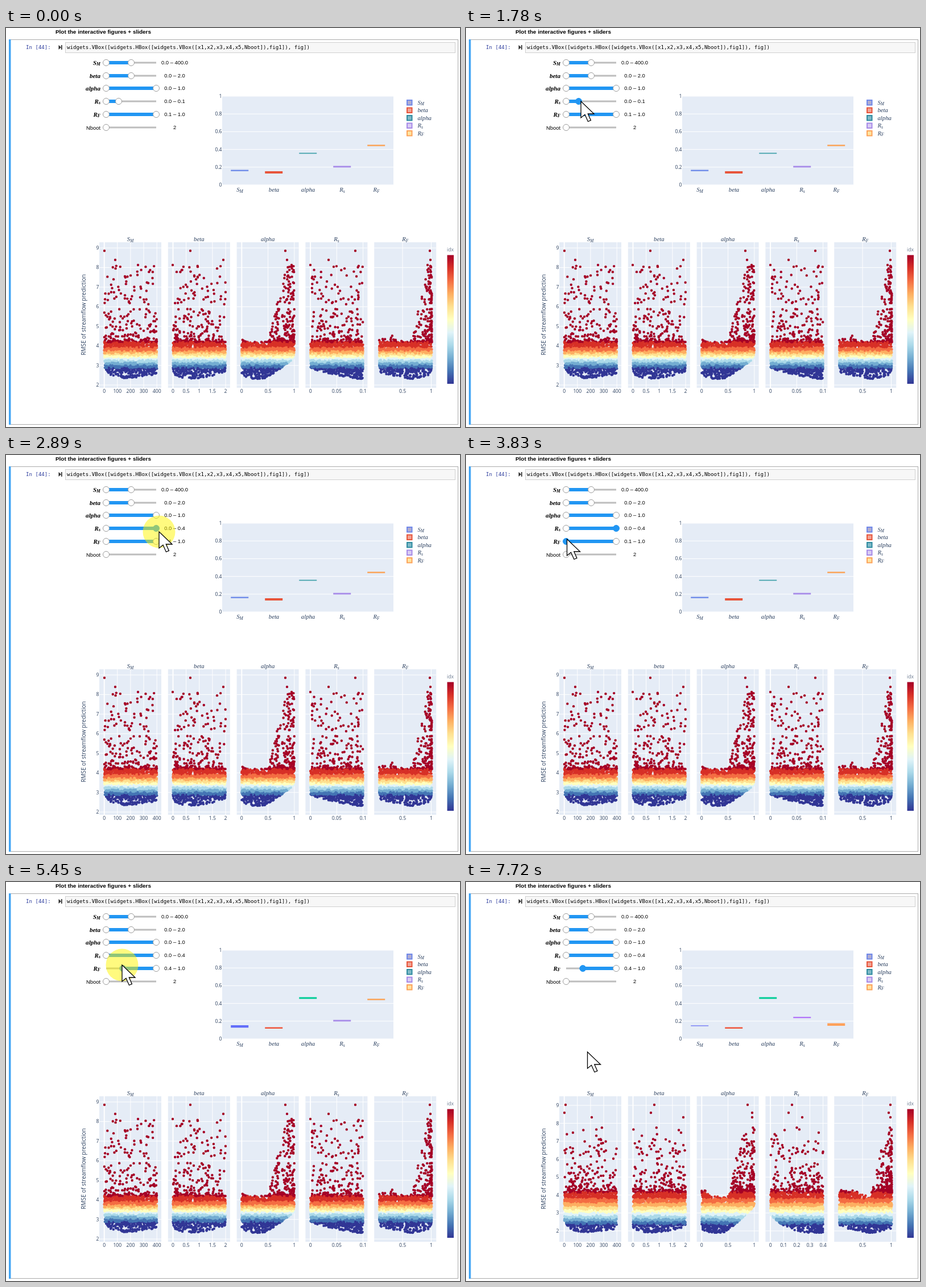
Animation of 798x702 px, one loop 8 s. Source, as an HTML page with a canvas:

```html
<!DOCTYPE html>
<html lang="en">
<head>
<meta charset="utf-8">
<title>Interactive figures</title>
<style>
  html, body { margin: 0; width: 100%; height: 100%; overflow: hidden; background: #fff; }
  svg, canvas { position: absolute; left: 0; top: 0; }
  text { white-space: pre; }
  .ui { font-family: "Liberation Sans", Arial, sans-serif; font-size: 9.4px; }
  .code { font-family: "DejaVu Sans Mono", monospace; font-size: 9.11px; }
  .math { font-family: "Liberation Serif", Times, serif; font-style: italic; font-size: 10.7px; fill: #2a3f5f; }
  .bold { font-weight: bold; font-size: 11.1px; fill: #000; }
  .tick { font-family: "Open Sans", sans-serif; font-size: 8.6px; fill: #2a3f5f; }
</style>
</head>
<body>
<svg id="page" width="798" height="702"></svg>
<canvas id="dots" width="798" height="702"></canvas>
<svg id="pointer" width="798" height="702"></svg>
<script>
const $ = id => document.getElementById(id);
const NAMES = ['S_M', 'beta', 'alpha', 'R_s', 'R_F'];
const SCALE = ['#a50026', '#d73027', '#f46d43', '#fdae61', '#fee090', '#ffffbf',
  '#e0f3f8', '#abd9e9', '#74add1', '#4575b4', '#313695'];
const BLUE = '#2196f3';

const rect = (x, y, w, h, fill, more = '') =>
  `<rect x="${x}" y="${y}" width="${w}" height="${h}" fill="${fill}" ${more}/>`;
const text = (x, y, s, cls, anchor = 'middle', more = '') =>
  `<text x="${x}" y="${y}" class="${cls}" text-anchor="${anchor}" ${more}>${s}</text>`;
const sub = s => s.replace(/_(.)/, '<tspan dy="1.6" font-size="0.7em">$1</tspan>');
const line = (x1, y1, x2, y2, width = 1) =>
  `<path d="M${x1} ${y1}L${x2} ${y2}" stroke="#fff" stroke-width="${width}"/>`;

// ---- notebook cell and bar chart frame
function notebook() {
  let s = text(87, 9.5, 'Plot the interactive figures + sliders', 'ui', 'start',
    'style="font-weight:bold;font-size:9.93px"');
  s += rect(5.5, 20.5, 789, 677, '#fff', 'stroke="#ababab"') + rect(5, 20, 3.5, 678, '#42a5f5');
  s += rect(104.5, 25.5, 685, 18, '#f7f7f7', 'stroke="#cfcfcf"');
  s += text(35, 37, 'In [44]:', 'code', 'start', 'fill="#303f9f"');
  s += '<path d="M92.5 30V38L97 34ZM97 30h1.7v8H97Z" fill="#333"/>';
  s += text(107, 37, 'widgets.VBox([widgets.HBox([widgets.VBox([x1,x2,x3,x4,x5,Nboot]),fig1]), fig])',
    'code', 'start');
  return s;
}

function barFrame() {
  const fills = ['#b1add0', '#f0a596', '#80bac8', '#d9cdf3', '#ffe4a0'];
  const edges = ['#6f88ea', '#e8553b', '#2f8ba0', '#a78be8', '#fda35a'];
  let s = rect(380, 120, 301, 156, '#e5ecf6');
  for (let i = 0; i <= 5; i++) {
    const y = 276 - i * 31.2;
    s += line(380, y, 681, y) + text(379.5, y + 3, i / 5, 'tick', 'end');
  }
  NAMES.forEach((name, i) => {
    const y = 131 + i * 13.5;
    s += text(411 + 60 * i, 288, sub(name), 'math');
    s += rect(705, y - 4, 8.5, 8.5, fills[i], `stroke="${edges[i]}" stroke-width="2"`);
    s += text(723.5, y + 3.5, sub(name), 'math', 'start');
  });
  return s;
}

// ---- scatter figure: the first run and the rerun with wider ranges
const RUNS = [
  { y9: 387, step: 34.45, tail: 138, drop: 37, rs: ['0', '0.05', '0.1'], rsDrop: [19, 1.5],
    edges: [0, 552.5, 562, 568, 572.5, 577, 580, 584, 588.5, 593, 598],
    top: [[392, 173, 324, 491, 614, 745], [408, 192, 382, 494, 567, 746], [417, 232, 293, 502, 535, 741]] },
  { y9: 393, step: 31.55, tail: 114, drop: 47, rs: ['0', '0.1', '0.2', '0.3', '0.4'], rsDrop: [32, 3],
    edges: [0, 546, 557, 564.5, 571, 577, 582, 586.5, 592, 597, 602],
    top: [[392, 175, 331, 495, 573, 746], [406, 173, 325, 503, 567, 743], [414, 221, 382, 503, 591, 746]] }
];
const panelX = p => 164 + 120.8 * p;

function scatterFrame() {
  let s = '';
  NAMES.forEach((name, p) => {
    s += rect(panelX(p), 377, 109, 256, '#e5ecf6') + text(panelX(p) + 54.5, 375, sub(name), 'math');
  });
  s += text(0, 0, 'RMSE of streamflow prediction', 'tick', 'middle',
    'transform="translate(139.5 504.5) rotate(-90)" style="font-size:9.96px"');
  s += text(781, 393, 'idx', 'tick', 'middle', 'fill-opacity=".7"');
  const stops = SCALE.map((c, i) => `<stop offset="${i / 10}" stop-color="${c}"/>`).join('');
  return s + `<linearGradient id="bar" x2="0" y2="1">${stops}</linearGradient>` +
    rect(775.5, 399.5, 11.5, 226.5, 'url(#bar)');
}

function axes(run) {
  const ticks = [['0', '100', '200', '300', '400'], ['0', '0.5', '1', '1.5', '2'], ['0', '0.5', '1'], run.rs, ['0.5', '1']];
  let s = '';
  ticks.forEach((labels, p) => {
    const x0 = panelX(p);
    for (let v = 2; v <= 9; v++) {
      const y = run.y9 + (9 - v) * run.step;
      s += line(x0, y, x0 + 109, y);
      if (!p) s += text(163.5, y + 3, v, 'tick', 'end');
    }
    labels.forEach((label, i) => {
      const x = p == 4 ? 697 + 50.5 * i : x0 + 8.7 + 92.5 * i / (labels.length - 1);
      s += line(x, 377, x, 633, label == '0' ? 2 : 1) + text(x, 642, label, 'tick');
    });
  });
  return s;
}

// lowest and highest pixel rows that panel p reaches at x in 0..1
function bottom(p, x, run) {
  const dip = [22 * Math.exp(-9 * x) + 7 * x * x, 9 * Math.exp(-8 * x) + 12 * x * x * x,
    7 * Math.exp(-10 * x) + run.drop * Math.max(0, (x - .4) / .6) ** 1.2,
    run.rsDrop[0] * (1 - x) ** run.rsDrop[1], 20 * Math.abs(x - .6) ** 1.1];
  return 617.5 - dip[p];
}
function ceiling(p, x) {
  if (p == 2) return x < .5 ? (x < .12 ? 547 : 556) : 555 - (x - .5) * 420;
  if (p == 4) return x < .35 ? 545 : x < .6 ? 554 : 552 - (x - .6) * 400;
  return 0;
}

function scatter(run, seed) {
  const canvas = document.createElement('canvas');
  canvas.width = 798;
  canvas.height = 702;
  const c = canvas.getContext('2d');
  const rnd = () => {
    seed = (seed + 0x6d2b79f5) | 0;
    let t = Math.imul(seed ^ seed >>> 15, 1 | seed);
    t = t + Math.imul(t ^ t >>> 7, 61 | t) ^ t;
    return ((t ^ t >>> 14) >>> 0) / 2 ** 32;
  };
  const dot = (x, y, band) => {
    c.fillStyle = SCALE[band];
    c.beginPath();
    c.arc(x, y, 2.2, 0, 7);
    c.fill();
  };
  const e = run.edges;
  for (let n = 0; n < 2500; n++) {
    const k = Math.floor(rnd() * 11), u = rnd();
    const y = k == 0 ? e[1] - run.tail * u ** 3.1
      : k == 10 ? e[10] + (617 - e[10]) * u ** 1.9
      : e[k] + u * (e[k + 1] - e[k]);
    for (let p = 0; p < 5; p++) {
      const skew = k ? 1 : p == 4 ? 2 : p == 2 ? 1.4 : 1;
      for (let tries = 0; tries < 60; tries++) {
        const x = 1 - rnd() ** skew;
        if (y > bottom(p, x, run) || y < ceiling(p, x) + rnd() * 10 - 5) continue;
        dot(panelX(p) + 8.7 + 92.5 * x, y, k);
        break;
      }
    }
  }
  for (const [y, ...xs] of run.top) xs.forEach(x => dot(x, y, 0));
  return canvas;
}

// ---- moving parts
const PATH = [[140, 764, 690], [500, 340, 300], [650, 154, 150], [740, 178, 110], [850, 218, 126],
  [930, 218, 128], [1160, 204, 132], [1479, 204, 132], [1480, 204, 130], [1640, 204, 130],
  [1780, 202, 129], [1949, 202, 129], [1950, 199, 129], [2180, 199, 129], [2420, 216.5, 131.5],
  [2890, 269, 135], [3120, 269, 135], [3600, 179, 149], [3829, 179, 149], [3830, 177.5, 148],
  [4430, 177.5, 148], [4530, 185, 147], [4680, 185, 147], [5070, 204, 146], [6320, 204, 146], [6710, 213.5, 299]];

function tip(t) {
  const i = PATH.findIndex(k => k[0] > t);
  if (i < 1) return PATH[i ? PATH.length - 1 : 0].slice(1);
  const [a, b] = [PATH[i - 1], PATH[i]];
  const f = (t - a[0]) / (b[0] - a[0]);
  return [a[1] + (b[1] - a[1]) * f, a[2] + (b[2] - a[2]) * f];
}

function slider(i, name, value, lo, hi, active = '') {
  const y = Math.round(61 + 22.7 * i);
  const knob = (x, on) => `<circle cx="${x}" cy="${y}" r="5.5" fill="${on ? BLUE : '#fff'}" stroke="${on ? BLUE : '#9e9e9e'}"/>`;
  let s = text(166, y + 3.5, sub(name), i < 5 ? 'math bold' : 'ui', 'end') + text(296.5, y + 3.4, value, 'ui');
  s += rect(176, y - 1.5, 88, 3, '#bdbdbd');
  if (hi) s += rect(lo, y - 3, hi - lo, 6, BLUE) + knob(hi, active == 'hi');
  return s + knob(lo, active == 'lo');
}

function sliders(t) {
  const rs = t < 2180 ? 198 : Math.max(198, Math.min(264, tip(t < 2890 ? t - 60 : 2890)[0] - 1));
  const steps = (t >= 4440) + (t >= 4690) + (t >= 5450);
  return slider(0, 'S_M', '0.0 – 400.0', 176, 220) + slider(1, 'beta', '0.0 – 2.0', 176, 220) +
    slider(2, 'alpha', '0.0 – 1.0', 176, 264) +
    slider(3, 'R_s', `0.0 – ${((rs - 176) / 220).toFixed(1)}`, 176, rs, t >= 1780 && t < 4060 ? 'hi' : '') +
    slider(4, 'R_F', `0.${1 + steps} – 1.0`, 176 + 9.78 * steps, 264, t >= 3600 ? 'lo' : '') +
    slider(5, 'Nboot', '2', 176);
}

function bars(t) {
  const list = [
    t < 4530 ? [249.5, 2.5, '#7490ea'] : t < 7720 ? [252, 4.3, '#636efa'] : [252, 1.8, '#8d95f6'],
    t < 4990 ? [252, 4, '#e8553b'] : [255.5, 2.5, '#ef553b'],
    t < 5450 ? [219.6, 1.7, '#3c9fa8'] : [202.6, 3, '#00cc96'],
    t < 5940 ? [242.6, 2.8, '#a78be8'] : [237.4, 2, '#ab63fa'],
    t < 6400 ? [205.4, 2.5, '#fba55a'] : [248.5, 4.5, '#ffa15a']
  ];
  return list.map(([y, h, fill], i) => rect(395.2 + 60 * i, y, 31, h, fill)).join('');
}

function pointer(t) {
  if (t < 140) return '';
  const [x, y] = tip(t);
  const pressed = t >= 2180 && t < 3120 || t >= 4060 && t < 5940;
  return (pressed ? `<circle cx="${x}" cy="${y}" r="28.5" fill="#fff600" fill-opacity=".5"/>` : '') +
    `<path transform="translate(${x} ${y})" d="M0 0V29L7 23.3L12.4 35.5L17.4 33.4L12.3 22H23Z" fill="#fff" stroke="#000" stroke-width="1.3"/>`;
}

$('page').innerHTML = notebook() + barFrame() + scatterFrame() +
  '<g id="sliders"></g><g id="bars"></g><g id="axes"></g>';
const clouds = RUNS.map((run, i) => scatter(run, 11 + i));
const shown = {};
let current = -1;

function update(id, html) {
  if (shown[id] !== html) $(id).innerHTML = shown[id] = html;
}

function draw() {
  const t = performance.now() % 8000;
  update('sliders', sliders(t));
  update('bars', bars(t));
  update('pointer', pointer(t));
  const run = +(t >= 7020);
  if (run !== current) {
    current = run;
    update('axes', axes(RUNS[run]));
    const c = $('dots').getContext('2d');
    c.clearRect(0, 0, 798, 702);
    c.drawImage(clouds[run], 0, 0);
  }
  requestAnimationFrame(draw);
}
draw();
</script>
</body>
</html>
```
